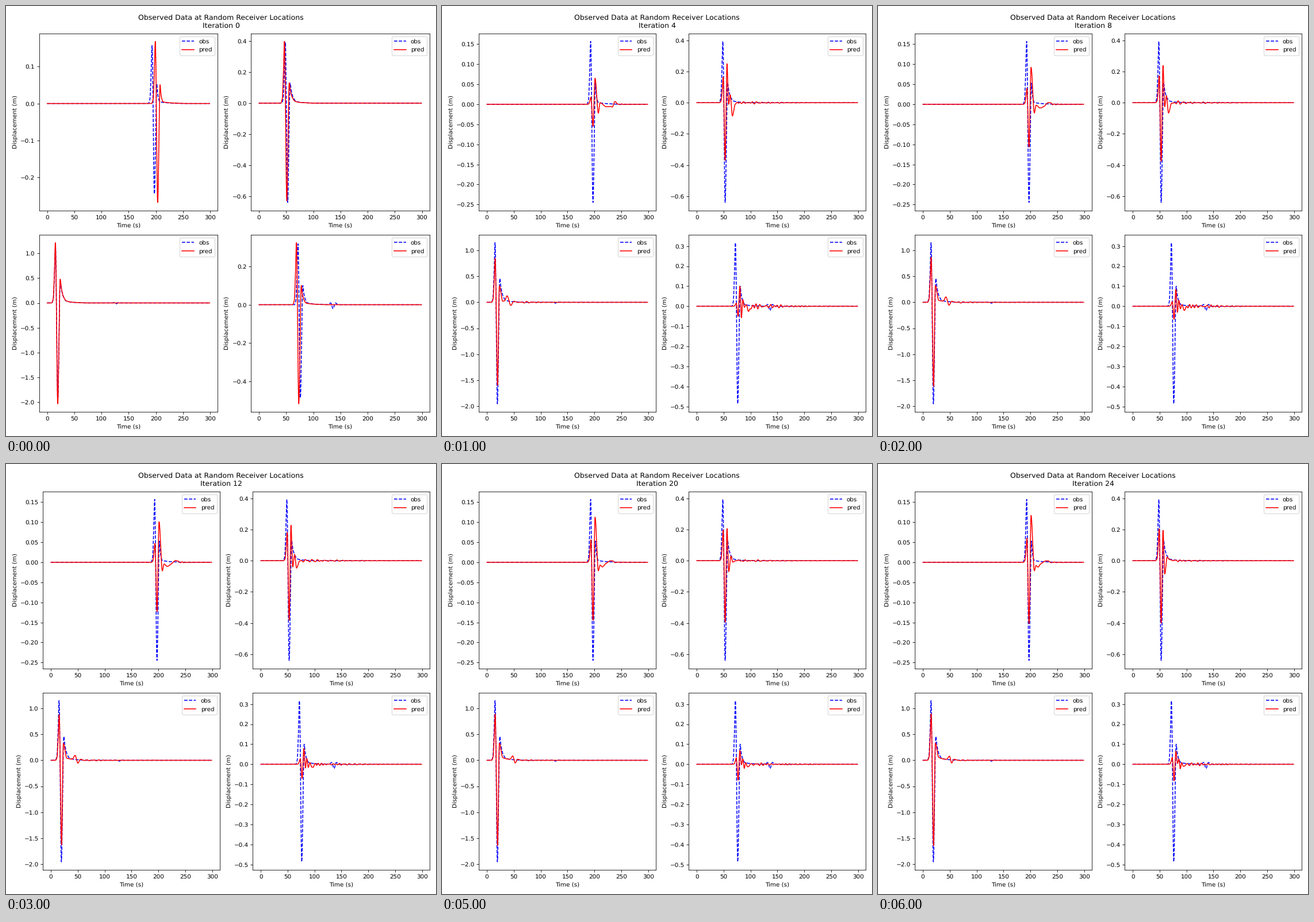
Recreate the animation shown at these times as a matplotlib script. Size 748 by 748 pixels, loop 6250 ms.

```python
import numpy as np
import matplotlib.pyplot as plt
from matplotlib.animation import FuncAnimation

FRAMES, INTERVAL = 25, 250
plt.rcParams["text.hinting"] = "none"
t = np.linspace(0, 299, 1197)


def smooth(knots):
    """Monotone cubic through (time, value) knots, flat outside them."""
    xk, yk = np.array(knots, float).T
    h = np.diff(xk)
    d = np.diff(yk) / h
    m = np.zeros_like(yk)
    same = d[:-1] * d[1:] > 0
    a, b = d[:-1][same], d[1:][same]
    m[1:-1][same] = 2 * a * b / (a + b)
    x = np.clip(t, xk[0], xk[-1])
    i = np.clip(np.searchsorted(xk, x, side="right") - 1, 0, len(h) - 1)
    s = (x - xk[i]) / h[i]
    return ((1 + 2 * s) * (1 - s) ** 2 * yk[i] + s * s * (3 - 2 * s) * yk[i + 1]
            + h[i] * (s * (1 - s) ** 2 * m[i] - s * s * (1 - s) * m[i + 1]))


def onset(peak, up):
    return [(peak - 7, 0), (peak - 4, 0.07 * up), (peak - 2.2, 0.4 * up), (peak, up)]


def pulse(peak, up, down, back, tail=1):
    """Arrival with a peak, a deep trough, a rebound and a slow decay."""
    r = peak + 8.8
    decay = [(r + tail * dt, back * np.exp(-dt / 4.5)) for dt in (2, 4, 6, 11)]
    return smooth(onset(peak, up) + [(peak + 4.3, down), (r, back)] + decay
                  + [(r + 22, 0.03 * back), (r + 52, 0)])


def ricker(center, amp, width):
    u = ((t - center) / width) ** 2
    return amp * (1 - u) * np.exp(-u / 2)


def coda(n, seed, amp, start, fade):
    """Small ringing after the main arrival, drifting with the iteration."""
    rng = np.random.default_rng(seed)
    period = rng.uniform(5.5, 13, 5)[:, None]
    phase = rng.uniform(0, 2 * np.pi, 5)[:, None]
    rate = rng.uniform(-0.7, 0.7, 5)[:, None]
    wave = np.cos(2 * np.pi * t / period + phase + rate * n).sum(0) / 2.5
    rise = np.clip((t - start) / 15, 0, 1)
    env = rise * np.exp(-np.maximum(t - start, 0) / fade)
    return amp * (1 - 0.02 * n) * env * wave


class Receiver:
    """Observed trace and a prediction easing from early to late knots."""

    def __init__(self, obs, first, early, late, power, ring):
        self.obs, self.first = obs, first
        self.early, self.late = np.array(early), np.array(late)
        self.power, self.ring = power, ring

    def pred(self, n):
        if n == 0:
            return self.first
        k = (max(n - 4, 0) / 20) ** self.power
        knots = (1 - k) * self.early + k * self.late
        end = (knots[-1, 0] + 7, 0)
        y = smooth(onset(*knots[0]) + [*knots[1:], end]) + coda(n, *self.ring)
        w = 0.04 * max(4 - n, 0) ** 2
        return w * self.first + (1 - w) * y


receivers = [
    Receiver(
        pulse(193, 0.157, -0.245, 0.053, 0.5),
        pulse(199, 0.1685, -0.2685, 0.051, 0.5),
        [(193.6, 0.018), (197.4, -0.055), (201.2, 0.065), (207.3, -0.022),
         (210.5, 0.004), (222, -0.006), (233, -0.006), (238, 0.006)],
        [(193.6, 0.06), (197.4, -0.153), (201.2, 0.117), (207.3, -0.021),
         (210.5, -0.008), (214, -0.012), (219, -0.004), (231, 0.004)],
        0.4, (3, 0.003, 225, 25)),
    Receiver(
        pulse(48.5, 0.394, -0.641, 0.13),
        pulse(46.9, 0.4, -0.63, 0.13),
        [(49.2, 0.165), (52.8, -0.37), (56.2, 0.25), (59.3, -0.01),
         (62.2, 0.05), (66.3, -0.085), (71.5, -0.008)],
        [(49.2, 0.205), (52.8, -0.4), (56.2, 0.195), (59.5, -0.085),
         (64, 0.025), (67, 0.01), (73, 0.004)],
        1, (5, 0.012, 68, 60)),
    Receiver(
        pulse(15.2, 1.151, -1.958, 0.46) + ricker(127.5, -0.017, 2.2),
        pulse(15.1, 1.217, -2.037, 0.48),
        [(15.4, 0.85), (19.8, -1.6), (23.2, 0.32), (29.5, 0.02),
         (33, 0.03), (37.5, 0.125), (44.5, -0.06), (50, 0.02)],
        [(15.4, 0.9), (19.8, -1.645), (23.2, 0.33), (29.5, 0.055),
         (44, 0.02), (49.3, 0.08), (53.5, -0.05), (58, 0.02)],
        0.5, (7, 0.014, 58, 60)),
    Receiver(
        pulse(71.9, 0.318, -0.486, 0.1, 0.8) + ricker(136.3, -0.021, 2.6),
        pulse(69, 0.323, -0.517, 0.1, 0.8),
        [(73.5, 0.015), (76.8, -0.05), (80.2, 0.1), (83, -0.057),
         (85.7, 0.033), (88.5, -0.005), (92, 0.008), (96.5, -0.025)],
        [(73.5, 0.034), (76.8, -0.082), (80.2, 0.065), (83, 0.004),
         (85.7, 0.026), (88.3, -0.022), (91, 0.008), (94, -0.01)],
        0.5, (11, 0.013, 92, 60)),
]

fig = plt.figure(figsize=(10, 10), dpi=74.8)


def draw(n):
    fig.clear()
    fig.subplots_adjust(0.125, 0.11, 0.9, 0.88, 0.2, 0.2)
    for ax, r in zip(fig.subplots(2, 2).flat, receivers):
        ax.plot(t, r.obs, "b--", label="obs")
        ax.plot(t, r.pred(n), "r", label="pred")
        ax.set_xlabel("Time (s)")
        ax.set_ylabel("Displacement (m)")
        ax.legend(loc="upper right")
    fig.suptitle(f"Observed Data at Random Receiver Locations\nIteration {n}")
    fig.tight_layout()
    return []


anim = FuncAnimation(fig, draw, frames=FRAMES, interval=INTERVAL, repeat=True)
plt.show()
```
